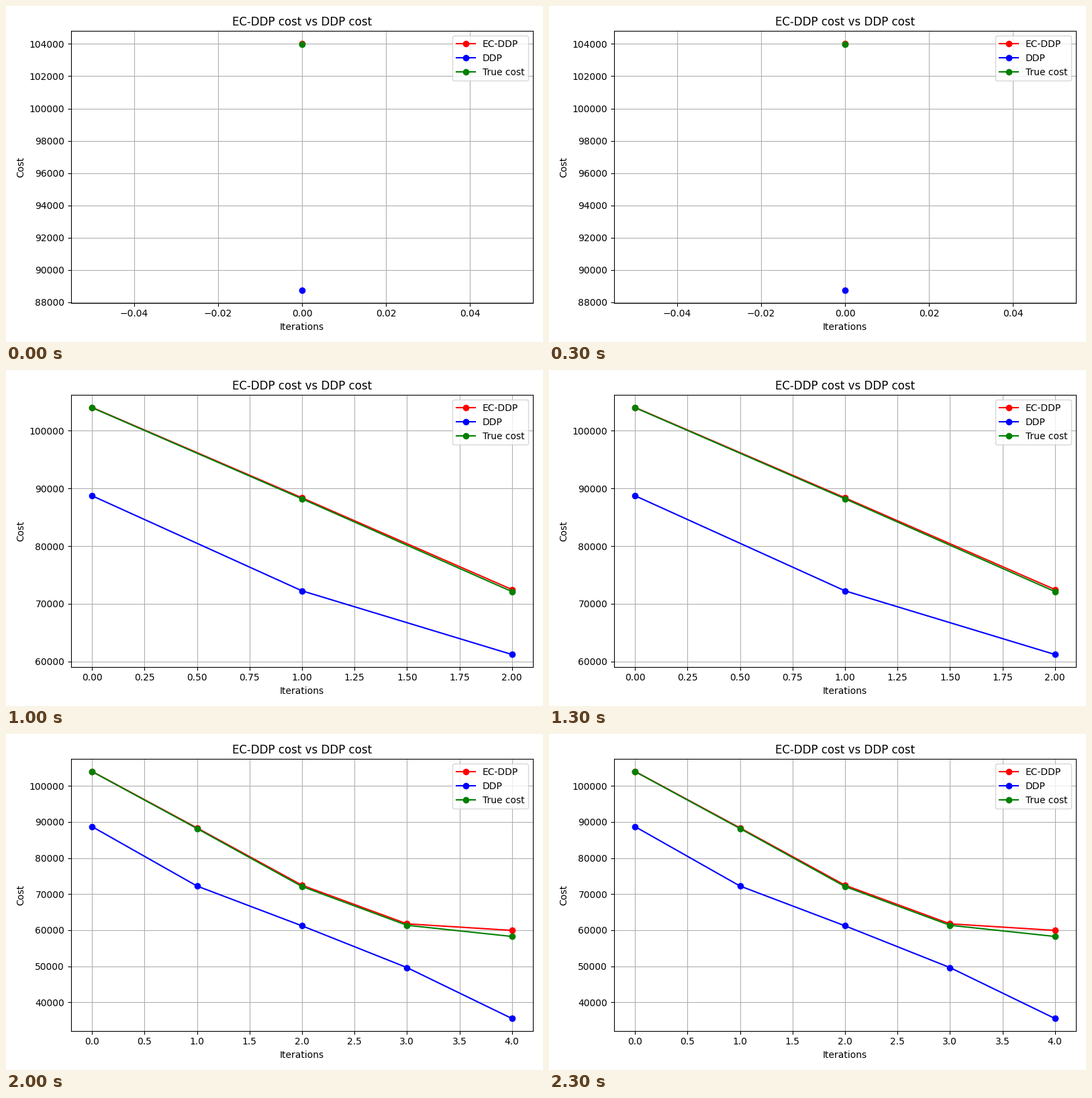
A matplotlib script for the animation above (2.5 s loop, 800 px wide and 500 px high).

```python
import matplotlib.pyplot as plt
from matplotlib.animation import FuncAnimation

SERIES = [
    ("EC-DDP", "red", [104030, 88370, 72480, 61770, 59950]),
    ("DDP", "blue", [88725, 72250, 61220, 49640, 35520]),
    ("True cost", "green", [103990, 88200, 72120, 61370, 58270]),
]
STEPS = 5
INTERVAL = 500

plt.rcParams["font.family"] = "DejaVu Sans"
fig = plt.figure(figsize=(8, 5), dpi=100)


def draw(step):
    """Plot every series up to the given iteration, with fresh axis limits."""
    fig.clear()
    ax = fig.add_subplot()
    for label, color, costs in SERIES:
        ax.plot(range(step + 1), costs[:step + 1], color=color, marker="o", label=label)
    ax.set_title("EC-DDP cost vs DDP cost")
    ax.set_xlabel("Iterations")
    ax.set_ylabel("Cost")
    ax.legend(loc="upper right")
    ax.grid(True)
    fig.tight_layout()
    return ax.lines


anim = FuncAnimation(fig, draw, frames=STEPS, init_func=lambda: [],
                     interval=INTERVAL, repeat=True, repeat_delay=0)
plt.show()
```
